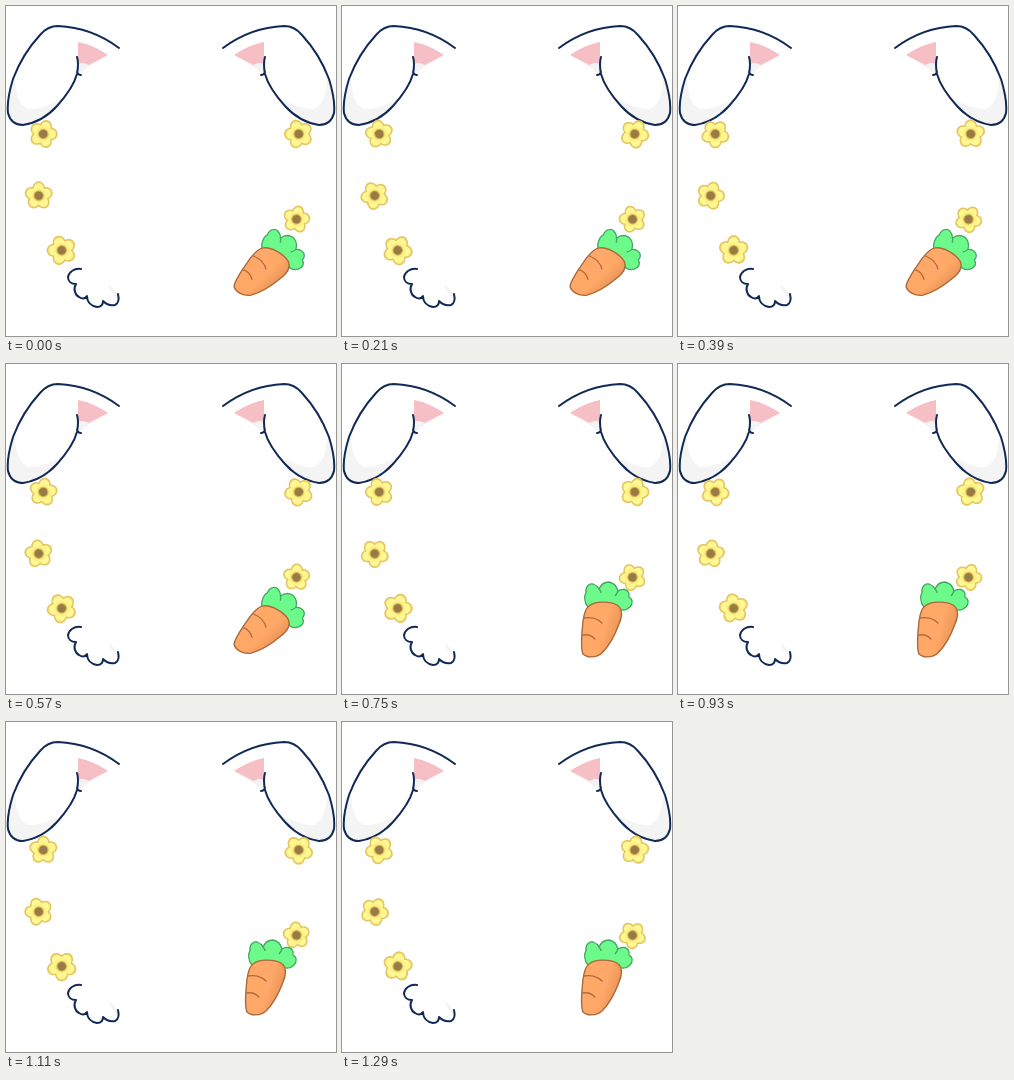
Recreate the animation shown at these times as an HTML page. Size 330 by 330 pixels, loop 1470 ms.

```html
<!DOCTYPE html>
<html lang="en">
<head>
<meta charset="utf-8">
<title>Bunny frame</title>
<style>
  html, body { margin: 0; width: 100%; height: 100%; overflow: hidden; background: #fff; }
  svg { display: block; width: 100vw; height: 100vh; }
  .ink { fill: none; stroke: #102a55; stroke-width: 2; stroke-linecap: round; stroke-linejoin: round; }
  .leaf { fill: #6cfb8a; stroke: #46a564; stroke-width: 1.3; stroke-linejoin: round; }
  .root { fill: url(#skin); stroke: #a9693c; stroke-width: 1.4; stroke-linejoin: round; }
  .crease { fill: none; stroke: #b06c3e; stroke-width: 1.3; stroke-linecap: round; }
</style>
</head>
<body>
<svg viewBox="0 0 330 330" xmlns="http://www.w3.org/2000/svg">
  <defs>
    <radialGradient id="petal" gradientUnits="userSpaceOnUse" cx="0" cy="0" r="14.5">
      <stop offset=".3" stop-color="#f0d96c"/>
      <stop offset=".46" stop-color="#fdf384"/>
      <stop offset=".72" stop-color="#fffa9b"/>
      <stop offset="1" stop-color="#f5df70"/>
    </radialGradient>
    <linearGradient id="skin" gradientUnits="userSpaceOnUse" x1="241" y1="262" x2="275" y2="272">
      <stop offset=".6" stop-color="#ffa868"/>
      <stop offset="1" stop-color="#ea9459"/>
    </linearGradient>
    <g id="ear">
      <path fill="#f4f4f5" d="M9 69C9 86 12 98 22 103C32 104 42 99 51 95L51 100C42 110 30 117 17 119C9 119 4 115 2 107C1 98 3 86 9 69Z"/>
      <path fill="#f3f3f4" d="M72 58L86 58L76 66L72 67Z"/>
      <path fill="#f5bfc5" d="M72 36C83 38 93 43 102 49L83 59C79 57 75 57 72 58Z"/>
      <path class="ink" d="M113 42C97 30 76 21 52 20C44 20 39 23 34 29C22 42 13 57 7 73C3 86 1 98 2 107C4 115 9 119 17 119C30 117 42 110 51 100C60 90 68 79 71 68C72 62 73 57 71 51M71 66Q72 69 75 69"/>
    </g>
  </defs>
  <use href="#ear"/>
  <use href="#ear" transform="matrix(-1 0 0 1 330 0)"/>
  <g id="tail">
    <path fill="#f3f3f4" d="M102 278L112 288L112 293C108 291 105 286 102 278Z"/>
    <path class="ink" d="M75 263C68 262 63 266 62 271C62 275 65 278 70 278C67 283 69 289 73 291C76 293 79 293 81 290C81 296 85 300 91 301C95 301 97 299 97 295C101 299 105 300 109 299C113 297 113 292 112 288"/>
  </g>
  <g id="flowers"></g>
  <g id="carrot">
    <path class="leaf" d="M246 243C242 239 242 231 244 229C243 223 247 219 251 220C254 221 256 223 257 225C259 220 263 218 267 218C272 219 275 223 276 227C280 224 286 225 287 230C287 231 287 232 287 233C291 235 291 240 288 243C285 246 281 247 277 245C267 239 256 239 246 243Z"/>
    <path class="leaf" style="fill:none" d="M257 225Q259 227 259 229M276 227Q275 230 273 232"/>
    <path class="root" d="M247 242C253 237 268 237 275 241C281 245 280 253 277 260C273 271 267 282 260 289C254 294 245 294 241 290C238 284 240 268 241 257C242 250 243 245 247 242Z"/>
    <path class="crease" d="M242 254C249 253 256 255 260 259M241 271C246 270 250 272 253 275"/>
  </g>
</svg>
<script>
const NS = "http://www.w3.org/2000/svg";
const LOOP = 1470, FIRST = 210, STEP = 180, TURN = 45;

// x, y, radius, starting angle
const spots = [
  [37.3, 128, 14.3, 18],
  [32.7, 189.7, 14.3, 0],
  [55.7, 244.3, 15, -18],
  [292.7, 128, 14.6, -18],
  [290.5, 213.3, 13.8, 12]
];

function add(parent, tag, attrs) {
  const el = document.createElementNS(NS, tag);
  for (const key in attrs) el.setAttribute(key, attrs[key]);
  return parent.appendChild(el);
}

function petals(radius) {
  const points = [];
  for (let i = 0; i < 120; i++) {
    const a = i * Math.PI / 60;
    const r = radius * (0.7 + 0.3 * Math.abs(Math.cos(2.5 * a)));
    points.push((r * Math.sin(a)).toFixed(2) + " " + (-r * Math.cos(a)).toFixed(2));
  }
  return "M" + points.join("L") + "Z";
}

const layer = document.getElementById("flowers");
const carrot = document.getElementById("carrot");
const flowers = spots.map(([x, y, radius, angle]) => {
  const el = add(layer, "g", {});
  add(el, "path", {
    d: petals(radius - 0.7), fill: "url(#petal)",
    stroke: "#e5c560", "stroke-width": 1.6, "stroke-linejoin": "round"
  });
  add(el, "circle", { r: 4.6, fill: "#987a44", stroke: "#d0b25c", "stroke-width": 1 });
  return { el, x, y, angle };
});

function draw(ms) {
  const t = ms % LOOP;
  const step = t < FIRST ? 0 : 1 + Math.floor((t - FIRST) / STEP);
  for (const f of flowers) {
    f.el.setAttribute("transform", `translate(${f.x} ${f.y}) rotate(${f.angle + step * TURN})`);
  }
  carrot.setAttribute("transform", step < 4 ? "translate(1 6.5) rotate(30 264 256)" : "");
}

let start = null;
function tick(now) {
  if (start === null) start = now;
  draw(now - start);
  requestAnimationFrame(tick);
}
draw(0);
requestAnimationFrame(tick);
</script>
</body>
</html>
```
